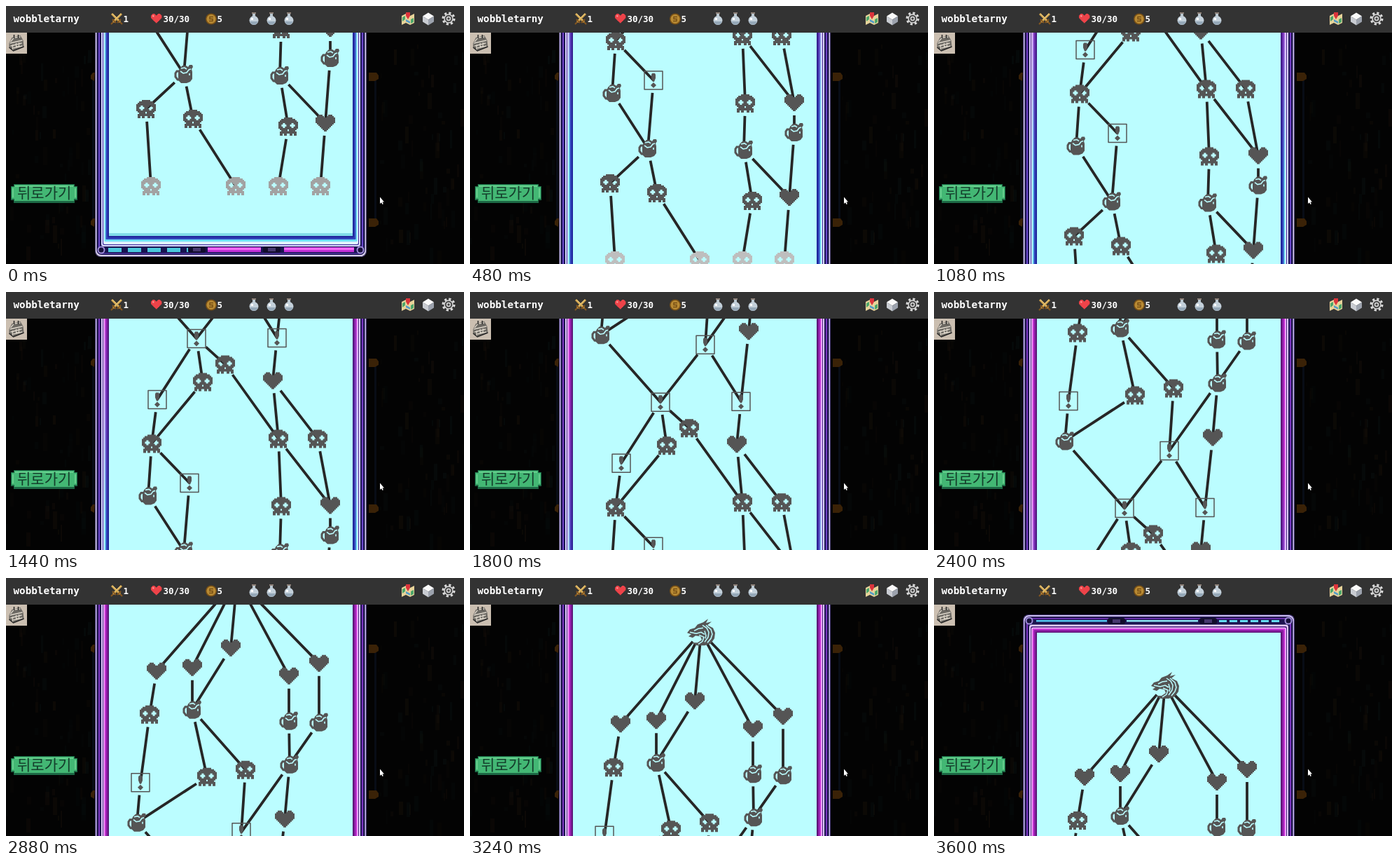
An HTML page for the animation above (3720 ms loop, 654 by 368 pixels).

```html
<!DOCTYPE html>
<html lang="ko">
<head>
<meta charset="utf-8">
<title>Map scroll</title>
<style>
  html, body { margin: 0; width: 100%; height: 100%; overflow: hidden; background: #000; }
  svg { display: block; }
  .hud { font: bold 12.5px "DejaVu Sans Mono", monospace; fill: #fff; }
  .name { font-size: 14.25px; }
  .back { font: 500 21px "Noto Sans CJK KR", "Noto Sans CJK", sans-serif; fill: #143d2b; }
</style>
</head>
<body>
<svg id="stage" width="654" height="368" viewBox="0 0 654 368"></svg>
<script>
const LOOP = 3720, STEP = 120;
const MAP_TRAVEL = 802, NOTCHES = 53;

// Wheel notches scrolled so far, as [step, notch] pairs.
const SCROLL = [[0, 0], [4, 7], [9, 12], [12, 18], [17, 28], [24, 43], [30, 53]];

// key, icon, centre x, centre y, keys of the nodes it leads to
const NODES = `
A dragon 330 153 BCDEF
B heart 215 284 G
C heart 266 279 H
D heart 321 251 H
E heart 404 291 I
F heart 447 273 J
G skull 205 346 K
H mug 266 339 LM
I mug 404 355 N
J mug 447 357 N
K event 192 443 O
L skull 287 435 O
M skull 342 425 P
N mug 405 417 PQ
O mug 187 500 R
P event 336 514 RS
Q heart 398 495 S
R event 272 596 TUV
S event 387 595 W
T event 216 683 X
U skull 281 658 X
V skull 313 633 Y
W heart 381 656 YZ
X skull 208 746 ab
Y skull 389 739 cd
Z skull 445 739 d
a mug 203 820 e
b event 262 802 e
c skull 393 835 f
d heart 463 834 g
e mug 254 899 hi
f mug 391 901 jk
g mug 463 876 k
h skull 200 949 l
i skull 267 963 m
j skull 403 974 n
k heart 456 969 o
l skull 207 1059
m skull 328 1059
n skull 389 1059
o skull 449 1059`.trim().split('\n').map(row => {
  const [key, icon, x, y, next = ''] = row.split(' ');
  return { key, icon, x: +x, y: +y, next: [...next] };
});
const byKey = Object.fromEntries(NODES.map(n => [n.key, n]));

const rect = (x, y, w, h, fill, extra = '') =>
  `<rect x="${x}" y="${y}" width="${w}" height="${h}" fill="${fill}" ${extra}/>`;
const path = (d, fill, extra = '') => `<path d="${d}" fill="${fill}" ${extra}/>`;
const stroke = (d, color, width = 1, extra = '') =>
  `<path d="${d}" fill="none" stroke="${color}" stroke-width="${width}" ${extra}/>`;
const at = (x, y, body, scale = 1) => `<g transform="translate(${x} ${y}) scale(${scale})">${body}</g>`;

const HEART = 'M2 0h3v1h1v1h2v-1h1v-1h3v1h1v1h1v4h-1v1h-1v1h-1v1h-1v1h-1v1h-1v1h-2v-1h-1v-1h-1v-1h-1v-1h-1v-1h-1v-1h-1v-4h1v-1h1z';
const EYE = 'v-1h1v-1h1.5v1h1v1.5h-1v1h-1.5v-1h-1z';
const SKULL = 'M4 0H10V1H12V2H13V3H14V8H13V9H12V10H13V13H11V11.5H10V13H8V11.5H6V13H4V11.5H3V13H1V10H2V9H1V8H0V3H1V2H2V1H4Z' +
  'M2.2 6' + EYE + 'M8.3 6' + EYE + 'M6.5 8.5h1v1.2h-1z';
const INK = '#555', PAPER = '#bbfdff';

const icons = {
  heart: () => at(-14, -12, path(HEART, INK), 2),
  skull: () => at(-14, -13, path(SKULL, 'currentColor', 'fill-rule="evenodd"'), 2),
  event: () => stroke('M-13 -13H13V13H-13Z', INK, 1.5, 'stroke-linejoin="round"') +
    path('M-2 -10H2L3 -8V-3L1 2H-1L-3 -3V-8ZM0 3L4 7L0 11L-4 7Z', INK),
  mug: () => stroke('M-5 -4H-10L-12 -1V4L-9 8H-4', INK, 3) +
    path('M-8 -3L-6 -8L-2 -12H3L6 -10L8 -13H12L13 -10L11 -7L12 -3V7L9 11L4 13H-4L-8 9Z', INK) +
    stroke('M-4 -8L1 -9L4 -7M-5 -4L-1 -1L4 -2L7 -6L10 -7M8 -1V2', PAPER, 1.6),
  dragon: () => path('M-20 1L-16 -4L-9 -6L-5 -11L3 -14L10 -19L7 -13L15 -15L9 -10L17 -6L20 1L19 9' +
      'L14 16L5 19H-6L-14 15L-5 15L1 11L-1 6L-8 5L-12 8L-18 6L-14 3Z', INK) +
    stroke('M-10 -2L-4 -5L3 -6M-16 0L-7 2L0 0L5 3M2 -10L8 -6L11 0L10 7L5 14' +
      'M7 -10L14 -4L16 3L14 9L9 15M-3 4L4 7L2 13L-4 17M5 -2L7 5L6 9', PAPER, 1.5)
};

function edge(a, b) {
  const gap = 18 / Math.hypot(b.x - a.x, b.y - a.y);
  return `M${a.x + (b.x - a.x) * gap} ${a.y + (b.y - a.y) * gap}L${b.x} ${b.y}`;
}

function frame() {
  // side inset, top inset, bottom inset, upper colour, lower colour
  const layers = [
    [0, 0, 0, '#3a2d66', '#4a4070'],
    [1, 1, 1, '#cbbff0', '#dcd4ee'],
    [2.5, 3, 3, '#20154c', '#1b1450'],
    [5, 5, 4.5, '#7a35c0', '#6a48cc'],
    [7, 6.5, 5.5, '#1d1450', '#191350'],
    [9, 14.5, 15, '#e3cdfb', '#dcdcff'],
    [11, 17, 17, '#45157a', '#3a2498'],
    [12, 18.5, 18, '#f0c6fb', '#dff4ff'],
    [13.5, 20, 22, '#d43fe0', '#6fe0f5'],
    [15.5, 22, 25, '#8d1ca6', '#3146bd'],
    [18, 24.5, 27.5, '#5d1678', '#20259c']
  ];
  let defs = '', body = '';
  layers.forEach(([side, top, bottom, c1, c2], i) => {
    defs += `<linearGradient id="rim${i}" x2="0" y2="1"><stop offset=".45" stop-color="${c1}"/>` +
      `<stop offset=".75" stop-color="${c2}"/></linearGradient>`;
    body += rect(127 + side, 52 + top, 388 - 2 * side, 1108 - top - bottom, `url(#rim${i})`,
      `rx="${Math.max(1, 8 - side / 2)}"`);
  });
  body += rect(147, 78, 348, 1052, PAPER) + rect(147, 1126, 348, 4, '#7fdbe8');

  body += rect(146, 60, 101, 2.5, '#55c8f2') + rect(275, 60, 102, 2.5, '#8ee5f5');
  for (let x = 407; x < 492; x += 15) body += rect(x, 60, 11, 3, '#65dcf2');
  for (let x = 146; x < 260; x += 28) body += rect(x, 1147, 19, 6, '#4bc8dc');
  for (const [x, w] of [[288, 76], [397, 100]])
    body += rect(x, 1146, w, 7, '#c02fd6') + rect(x, 1147, w, 3, '#f06af4');
  for (const [x, y] of [[248, 57], [379, 57], [260, 1145], [367, 1145]])
    body += rect(x, y, 25, 9, '#120c2c', 'rx="3"') + rect(x + 7, y + 2, 11, 5, '#47386f');
  for (const x of [136, 506]) for (const y of [61, 1150])
    body += `<circle cx="${x}" cy="${y}" r="4.5" fill="#17103a" stroke="#9d8bd6" stroke-width="2"/>`;
  return `<defs>${defs}</defs>${body}`;
}

function backdrop() {
  let seed = 7;
  const rnd = () => (seed = seed * 16807 % 2147483647) / 2147483647;
  let out = rect(0, 0, 654, 368, '#030303');
  for (let i = 0; i < 130; i++) {
    const x = (i % 2 ? 530 : 0) + rnd() * 122, y = 55 + rnd() * 300;
    out += rect(x.toFixed(), y.toFixed(), 2 + (rnd() * 5 | 0), 5 + (rnd() * 22 | 0),
      rnd() < .65 ? '#1c140b' : '#0a1313', `opacity="${(.1 + rnd() * .3).toFixed(2)}"`);
  }
  out += rect(526, 106, 3, 198, '#080c16') + rect(123, 106, 3, 198, '#080c16');
  for (const y of [95, 303])
    out += path(`M518 ${y}h11l3 4v5l-5 3h-9zM127 ${y}h-3l-3 4v5l5 3z`, '#3a2207');
  return out;
}

function header() {
  const sword = stroke('M-7 -7L5 5', '#d2a64f', 3) + stroke('M-6 -7L4 3', '#f3d68b') +
    stroke('M1 6L6 1M5 5L8 8', '#86571f', 2);
  const flask = rect(-2, -8, 4, 6, '#b9c6cf') + rect(-3, -9, 6, 2, '#8d8078') +
    '<circle cy="2.5" r="6.5" fill="#c3d0da"/>' +
    path('M-6 4H6L3 8.5H-3Z', '#95a8b8') + rect(-4, -1, 3, 3, '#fff');
  const map = path('M-9 -4L-3 -7L3 -4L9 -7V6L3 9L-3 6L-9 9Z', '#e8d49a') +
    path('M-8 -2L-4 -4V1L-8 4ZM4 1L8 -1V5L4 7Z', '#4ca76b') + path('M-3 1L3 4V7L-3 4Z', '#559dc7') +
    path('M-3 -9H3V-4L0 1L-3 -4Z', '#dc343b');
  const cube = path('M0 -9L8 -4L0 1L-8 -4Z', '#fafafa') + path('M-8 -4L0 1V9L-8 4Z', '#c9ccd2') +
    path('M8 -4L0 1V9L8 4Z', '#9ca2ad');
  const gear = '<circle r="8" fill="none" stroke="#dadada" stroke-width="3" stroke-dasharray="3.2 3.083"/>' +
    '<circle r="6" fill="#444" stroke="#dadada" stroke-width="1.5"/>' +
    '<circle r="2.5" fill="none" stroke="#dadada" stroke-width="1.5"/>';
  const coin = '<circle r="8" fill="#795016"/><circle r="6.5" fill="#b98b34"/>' +
    stroke('M3 -3H-2V0H2V3H-3', '#795016', 1.5);
  return rect(0, 0, 654, 38, '#333') +
    '<text class="hud name" x="10.5" y="23">wobbletarny</text>' +
    at(158, 18, sword + `<g transform="scale(-1 1)">${sword}</g>`) +
    '<text class="hud" x="167.5" y="23">1</text>' +
    at(207, 11, path(HEART, '#ee4349') + rect(2, 2, 2, 2, '#ff9c99'), 1.1) +
    '<text class="hud" x="224.5" y="23">30/30</text>' +
    at(293, 18.5, coin) + '<text class="hud" x="301.5" y="23">5</text>' +
    [354, 379, 404].map(x => at(x, 18, flask)).join('') +
    at(574, 18, map) + at(603, 18.5, cube) + at(632, 18, gear);
}

function controls() {
  const chest = path('M-10 0L-6 -8L6 -11L10 -4L11 5L-4 11L-10 6Z', '#6c6963') +
    stroke('M-9 0L9 -4M-5 2V10M-8 -2L-3 -8L6 -9M0 0V5H4V-1M-8 4L8 0M-4 7L9 4', '#ddd6ca', 1.3) +
    stroke('M-10 6L-4 11L11 5M-3 -12V-7M3 -12V-7', '#252525', 1.5);
  const button = path('M11 254H98V257H102V277H98V281H11V277H7V257H11Z', '#1d6845') +
    path('M12 255H97V258H101V275H97V278H12V275H8V258H12Z', '#43b774') +
    stroke('M13 257H96M10 260V273M99 260V273', '#72d594', 1.5);
  return rect(0, 38, 30, 30, '#cbbfb1') + at(14.5, 53, chest) + button +
    '<text class="back" x="16" y="274">뒤로가기</text>' +
    path('M534 272.5V282L536 280.2L537.5 283L538.8 282.2L537.5 279.5H540Z', '#fff');
}

const edges = NODES.flatMap(n => n.next.map(k => edge(n, byKey[k]))).join('');
const drawNode = n => at(n.x, n.y, icons[n.icon]());
const isStart = n => !n.next.length;

document.getElementById('stage').innerHTML = backdrop() +
  `<g id="map">${frame()}${stroke(edges, '#262626', 3.8)}` +
  `<g color="${INK}">${NODES.filter(n => !isStart(n)).map(drawNode).join('')}</g>` +
  `<g id="starts">${NODES.filter(isStart).map(drawNode).join('')}</g></g>` +
  header() + controls();

const mapGroup = document.getElementById('map');
const starts = document.getElementById('starts');

function notchesAt(step) {
  const i = Math.max(1, SCROLL.findIndex(([s]) => s >= step));
  const [s0, n0] = SCROLL[i - 1], [s1, n1] = SCROLL[i];
  return Math.round(n0 + (n1 - n0) * (step - s0) / (s1 - s0));
}

function render(time) {
  const step = Math.floor(time % LOOP / STEP);
  const y = (notchesAt(step) / NOTCHES - 1) * MAP_TRAVEL;
  mapGroup.setAttribute('transform', `translate(0 ${y.toFixed(2)})`);
  const grey = Math.min(192, 162 + step * 7);
  starts.setAttribute('color', `rgb(${grey},${grey},${grey})`);
}

const origin = performance.now();
function tick() {
  render(performance.now() - origin);
  requestAnimationFrame(tick);
}
tick();
</script>
</body>
</html>
```
